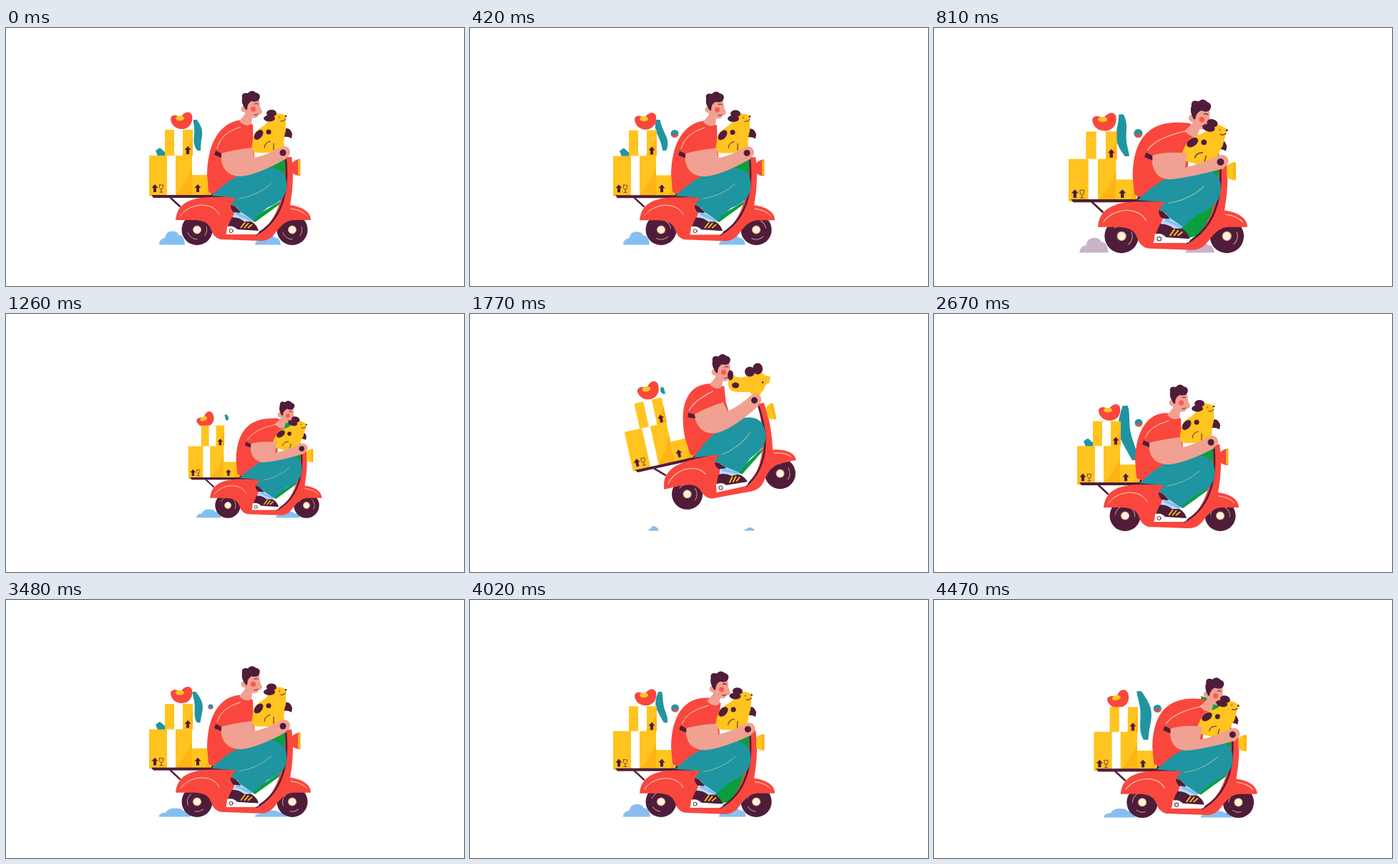
Recreate the animation shown at these times as an HTML page. Size 640 by 360 pixels, loop 4.5 s.

```html
<!DOCTYPE html>
<html lang="en">
<head>
<meta charset="utf-8">
<title>Scooter delivery</title>
<style>
html, body { margin: 0; width: 100%; height: 100%; overflow: hidden; background: #fff; }
svg { display: block; width: 100vw; height: 100vh; }
.red { fill: #f9473e; } .dark { fill: #4f1d3a; } .gold { fill: #ffc41f; } .amber { fill: #fdb515; }
.teal { fill: #1f95a1; } .skin { fill: #f0a191; } .green { fill: #0a9f3c; } .white { fill: #fff; }
.sky { fill: #85bff2; }
.line { fill: none; stroke: #fbd9b4; stroke-linecap: round; }
.ink { fill: none; stroke: #4f1d3a; stroke-linecap: round; }
.bold { stroke-width: 2.5; }
</style>
</head>
<body>
<svg viewBox="0 0 640 360">
  <defs>
    <path id="up" class="dark" d="M0-6L4.5-1H2V5H-2V-1H-4.5Z"/>
    <path id="cloud" d="M-18 0Q-18-8-10-9Q-8-18 0-18Q8-18 9-13Q17-13 18 0Z"/>
    <g id="wheel">
      <circle class="dark" r="21.5"/>
      <path class="line" stroke-opacity=".7" d="M-13 4A13.5 13.5 0 0 0 0 13.5M13 -4A13.5 13.5 0 0 1 11 8"/>
      <circle r="5.5" fill="#fff3dc" stroke="#e9a37e"/>
    </g>
  </defs>
  <g id="ground">
    <use id="dustA" href="#cloud"/><use id="dustB" href="#cloud"/>
  </g>
  <g id="ride">
    <path id="scarf" class="teal"/>
    <g id="bit"><circle class="teal" r="5.5"/><path class="red" d="M-4 0Q0 3 5-1Q5 5 0 5Q-4 5-4 0Z"/></g>

    <g id="load">
      <path id="leaf" class="teal" d="M209 171L215 167L223 174V179H212Z"/>
      <g id="bowl">
        <path class="red" d="M230 126C232 119 240 122 244 125C250 115 258 116 260 122C262 134 254 141 246 141C236 141 230 134 230 126Z"/>
        <ellipse class="gold" cx="243" cy="126" rx="6" ry="3.500"/>
      </g>
      <g id="crates"></g>
      <use href="#up" x="254" y="171"/><use href="#up" x="208" y="224"/><use href="#up" x="268" y="224"/>
      <path class="ink" stroke-opacity=".75" d="M214.500 219H219.500Q220 225 217 225Q214 225 214.500 219ZM217 225V229M215 229H219"/>
    </g>

    <path id="legGap" class="green" d="M340 269L388 240Q386 260 366 280L352 284Z"/>
    <path class="green" d="M341 267L388 239L381 247L348 271Z"/>
    <path id="armGap" class="green" d="M358 195L390 176L393 222Z"/>
    <path id="chinGap" class="green" d="M348 135L380 142L368 168L350 172Z"/>
    <use id="wheelA" href="#wheel"/><use id="wheelB" href="#wheel"/>

    <g id="frame">
      <path class="ink bold" d="M230 237L243 249"/>
      <path class="dark" d="M203 233H326V237H206ZM286 234L290 222H322V236Z"/>
      <path class="red" d="M237 268C239 246 255 237 285 236L326 236Q319 262 307 288H350C374 276 392 238 390 180H399C403 205 400 230 397 247C414 249 426 257 426 268H402C386 269 380 283 372 291Q366 297 355 297L300 295Q290 293 286 280C282 269 270 268 258 268Z"/>
      <path class="ink bold" d="M391 184C396 235 382 270 350 288"/>
      <path class="line" d="M244 262C256 244 288 241 298 260M398 252Q414 254 420 262"/>
    </g>

    <path id="torso" class="red"/>
    <g id="legs">
      <path fill="#b9dcf6" d="M320 250L346 265L341 272L318 264Z"/>
      <path class="sky" d="M323 257L344 267L342 270L321 260Z"/>
      <path class="teal" d="M287 234Q308 214 325 206C350 191 389 188 392 214C394 235 384 243 365 251L345 268L327 256Q322 248 314 246L322 237Z"/>
      <path class="dark" d="M314 247Q322 248 328 258L318 257Q313 252 314 247Z"/>
      <path class="line" stroke-opacity=".55" d="M326 238Q352 234 371 217"/>
      <path class="dark" d="M316 264Q326 264 333 270H343Q351 275 353 283H309Q311 272 316 264Z"/>
      <path class="white" d="M309 277Q318 275 323 281L354 283Q353 288 349 288H308Z"/>
      <circle class="ink" cx="314.500" cy="283" r="2.500"/>
      <path d="M328 279l6-8M333 279l6-7M338 279l6-5" fill="none" stroke="#ffc41f" stroke-width="1.800"/>
    </g>

    <g id="bar">
      <path id="lamp" d="M400 188Q405 183 411 183V206Q404 206 400 202Z"/>
      <path class="amber" d="M408 184h3.500v21H408Z"/>
    </g>
    <path id="mirror" class="dark" d="M385 143Q396 135 400 148L399 154Q392 150 386 153Z"/>

    <g id="head">
      <path class="skin" d="M333 103L354 101L355 110L358 117Q357 121 353 121Q351 127 344 125L343 134Q335 139 326 130L334 120Z"/>
      <circle class="skin" cx="333" cy="113" r="4.500"/>
      <path class="dark" d="M335 114Q328 104 330 98Q328 89 338 91Q343 85 349 90Q357 92 354 99Q352 104 343 102Q337 105 337 114Z"/>
      <circle class="red" cx="345.500" cy="113" r="3.500" opacity=".8"/>
      <path class="ink" d="M347 106Q350 104 352 106M347 121Q350 122 352 120"/>
    </g>

    <g id="dog">
      <path class="gold" d="M347 149C343 164 341 174 352 174H367L389 169Q387 155 391 143V122Q378 115 368 125C366 138 351 138 347 149Z"/>
      <ellipse class="dark" cx="353" cy="149" rx="8" ry="5" transform="rotate(-50 353 149)"/>
      <ellipse class="dark" cx="371" cy="119" rx="7" ry="5"/>
      <ellipse class="dark" cx="368" cy="126" rx="8" ry="4.500"/>
      <circle class="dark" cx="367" cy="145" r="3.500"/>
      <circle class="dark" cx="391" cy="123" r="1.300"/>
      <path class="ink" d="M382 124v1M384 130Q388 131 391 127M361 167Q361 160 369 158M374 161V170"/>
    </g>
    <g id="leap" transform="rotate(12.5 333.500 281.500) translate(-35 44)">
      <path class="gold" d="M361 92Q363 81 371 88Q382 91 388 86Q402 76 412 86L420 88L418 97Q411 99 411 106Q402 113 402 128H396Q396 115 391 109Q373 111 365 107Q360 103 361 92Z"/>
      <ellipse class="dark" cx="364" cy="86" rx="4" ry="7"/>
      <ellipse class="dark" cx="391" cy="81" rx="7" ry="7"/>
      <ellipse class="dark" cx="402" cy="77" rx="7" ry="8"/>
      <ellipse class="dark" cx="371" cy="100" rx="5" ry="4"/>
      <circle class="dark" cx="409" cy="96" r="1.300"/>
    </g>

    <path id="arm" class="skin"/>
    <path id="hem" class="dark"/>
    <path id="sleeve" class="line"/>
    <g id="hand"><circle class="skin" r="8"/><circle class="dark" cx="-2" cy="1" r="4.500"/></g>
  </g>
</svg>
<script>
const LOOP = 4500, CYCLE = 3390, STEP = 30;
const el = {};
document.querySelectorAll('[id]').forEach(e => el[e.id] = e);

const move = (id, transform) => el[id].setAttribute('transform', transform);
const path = (id, d) => el[id].setAttribute('d', d);
const show = (id, on) => el[id].setAttribute('display', on ? 'inline' : 'none');
const mix = (a, b, p) => a + (b - a) * p;

// Smooth step from 0 to 1 between times a and b
function ease(t, a, b) {
  const p = Math.min(1, Math.max(0, (t - a) / (b - a)));
  return p * p * (3 - 2 * p);
}
// Rises from a to b, holds, falls from c to d
const pulse = (t, a, b, c, d) => ease(t, a, b) - ease(t, c, d);

function crate(x, y, w, h, tape) {
  const r = x + w, low = y + h;
  return `<path class="gold" d="M${x} ${y}H${r}V${low}H${x}Z"/>
    <path class="amber" d="M${r} ${y + h * .3}V${low}H${r - w * .4}Q${r - w * .15} ${low - h * .3} ${r} ${y + h * .3}Z"/>` +
    (tape ? `<path class="white" d="M${tape} ${y}h12v${h}h-12Z"/>` : '');
}
el.crates.innerHTML = crate(222, 142, 39, 36, 235) + crate(200, 178, 60, 56, 225) + crate(260, 205, 26, 29);

// Body squash: engine shake at rest, one held crouch around the hop
function bounce(c) {
  const s = c > CYCLE / 2 ? c - CYCLE : c;
  const idle = (1 - Math.cos(.2 + s / 480 * 2 * Math.PI)) / 2;
  return mix(idle, 1 - pulse(c, 1080, 1500, 1900, 2400), pulse(c, 580, 760, 2400, 2560));
}

function drawScarf(c) {
  const len = 43 + 24 * pulse(c, 600, 1080, 1080, 1260)
    - 33 * pulse(c, 1080, 1260, 2000, 2400) + 33 * pulse(c, 2350, 2650, 2700, 3300);
  const left = [], right = [];
  for (let i = 0; i <= 12; i++) {
    const p = i / 12, y = 128 + len * p;
    const x = 264 + len * p / 6 + len / 20 * Math.sin(p * 5.5 - c / 160);
    const w = (2 + len / 12) * Math.sqrt(Math.sin(Math.PI * (.06 + .88 * p)));
    left.push(`${x - w} ${y}`);
    right.unshift(`${x + w} ${y}`);
  }
  path('scarf', `M${left.join('L')}L${right.join('L')}Z`);
}

function drawDust(c, around) {
  const size = 1 - pulse(c, 1300, 2100, 3000, CYCLE);
  const ripple = Math.cos(c / 200 * 2 * Math.PI);
  const x = 234 - 2 * ripple - 18 * (1 - size);
  const w = size * (1.12 - .12 * ripple), h = size * (.85 + .2 * ripple);
  const tint = pulse(c, 600, 760, 880, 1040);
  el.ground.setAttribute('fill', `rgb(${mix(133, 201, tint)}, ${mix(191, 179, tint)}, ${mix(242, 198, tint)})`);
  move('ground', around);
  move('dustA', `translate(${x} 302.5) scale(${w} ${h})`);
  move('dustB', `translate(${x + 134} 302.5) scale(${w} ${h * .75})`);
}

// b: squash, lean: hunch over the bars, hop: airborne pose
function drawRider(b, lean, hop) {
  const nx = 21 * lean + 5 * hop, ny = 11 * b + 9 * lean + 11 * hop;
  const hx = 389 + 5 * lean, hy = 173 + 5 * b + 9 * lean;
  const sx = 291 + 5 * lean, sy = 177 + 5 * b, ey = 207 + 3 * b;
  const top = 128 + ny - 9 * lean;
  path('torso', `M${331 + nx} ${top}C${306 + 6 * lean} ${130 + 4 * b} 282 ${150 + 4 * b - 6 * lean} 281 205L283 228Q290 236 325 236L350 206L${346 + nx * .3} 168L${345 + nx} ${top + 7}Z`);
  path('arm', `M${sx + 9} ${sy - 2}Q${sx + 9} ${ey} 328 ${ey}Q352 ${ey - 2} ${hx + 3} ${hy + 9}L${hx - 5} ${hy - 7}Q366 ${hy + 4} 347 ${hy + 8}L${344 + 6 * lean} ${sy - 10 + 5 * lean}Q322 ${sy - 8} ${sx + 9} ${sy - 2}Z`);
  path('hem', `M${sx} ${sy}l2 -6l8 4v6Z`);
  path('sleeve', `M${328 + nx} ${top + 10}Q${300 + nx * .5} ${top + 18} ${sx + 4} ${sy - 9}`);
  move('head', `translate(${nx} ${ny}) rotate(${8 * lean + 12.5 * hop} 336 128)`);
  move('hand', `translate(${hx} ${hy})`);
  move('dog', `translate(${-3 * lean} ${6 * b + 8 * lean}) rotate(${15 * lean} 355 174)`);
  move('mirror', `translate(0 ${7 * b + 13 * lean})`);
}

function draw(t) {
  const c = t % CYCLE;
  const b = bounce(c);
  const lean = pulse(c, 560, 770, 1240, 1600);
  const hop = pulse(c, 1400, 1700, 1780, 2300);
  const scale = 1 + .2 * ease(c, 680, 930) - .38 * ease(c, 930, 1230) + .18 * ease(c, 1230, 1500);
  const dx = 35 * pulse(c, 870, 1200, 1800, 2300);
  const dy = -58 * pulse(c, 1440, 1920, 2020, 2400);
  const zoom = `translate(313 198) scale(${scale}) translate(-313 -198)`;

  move('ride', `translate(${dx} ${dy}) rotate(${-12.5 * hop} 333.5 281.5) ${zoom}`);
  drawDust(c, `translate(${dx} 0) ${zoom}`);
  drawScarf(c);
  drawRider(b, lean, hop);

  const slip = 15 * pulse(c, 900, 1180, 1260, 1700);
  const bit = pulse(c, 0, 150, 1080, 1240) + pulse(c, 2300, 2600, 3000, 3330);
  move('load', `translate(0 ${234 + 4 * b}) scale(1 ${1 - .04 * b}) translate(0 -234)`);
  move('bowl', `translate(${-slip} ${slip * .2}) rotate(${-slip * 1.5} 245 131)`);
  move('bit', `translate(${286 + 2 * lean} ${147 + 5 * b}) scale(${bit})`);
  move('frame', `translate(0 ${2 * b})`);
  move('legs', `translate(0 ${2 * b})`);
  move('bar', `translate(0 ${5 * b})`);
  move('wheelA', `translate(267 281.5) rotate(${c * .75})`);
  move('wheelB', `translate(400 281.5) rotate(${c * .75})`);

  const active = c > 620 && c < 2300;
  const leaping = c > 1590 && c < 2200;
  el.lamp.setAttribute('class', active ? 'gold' : 'red');
  show('leaf', !active);
  show('legGap', active && c < 1000);
  show('chinGap', c > 1000 && c < 1500);
  ['armGap', 'mirror', 'dog'].forEach(id => show(id, !leaping));
  show('leap', leaping);
}

const start = performance.now();
function tick() {
  const t = (performance.now() - start) % LOOP;
  draw(Math.floor(t / STEP) * STEP);
  requestAnimationFrame(tick);
}
tick();
</script>
</body>
</html>
```
